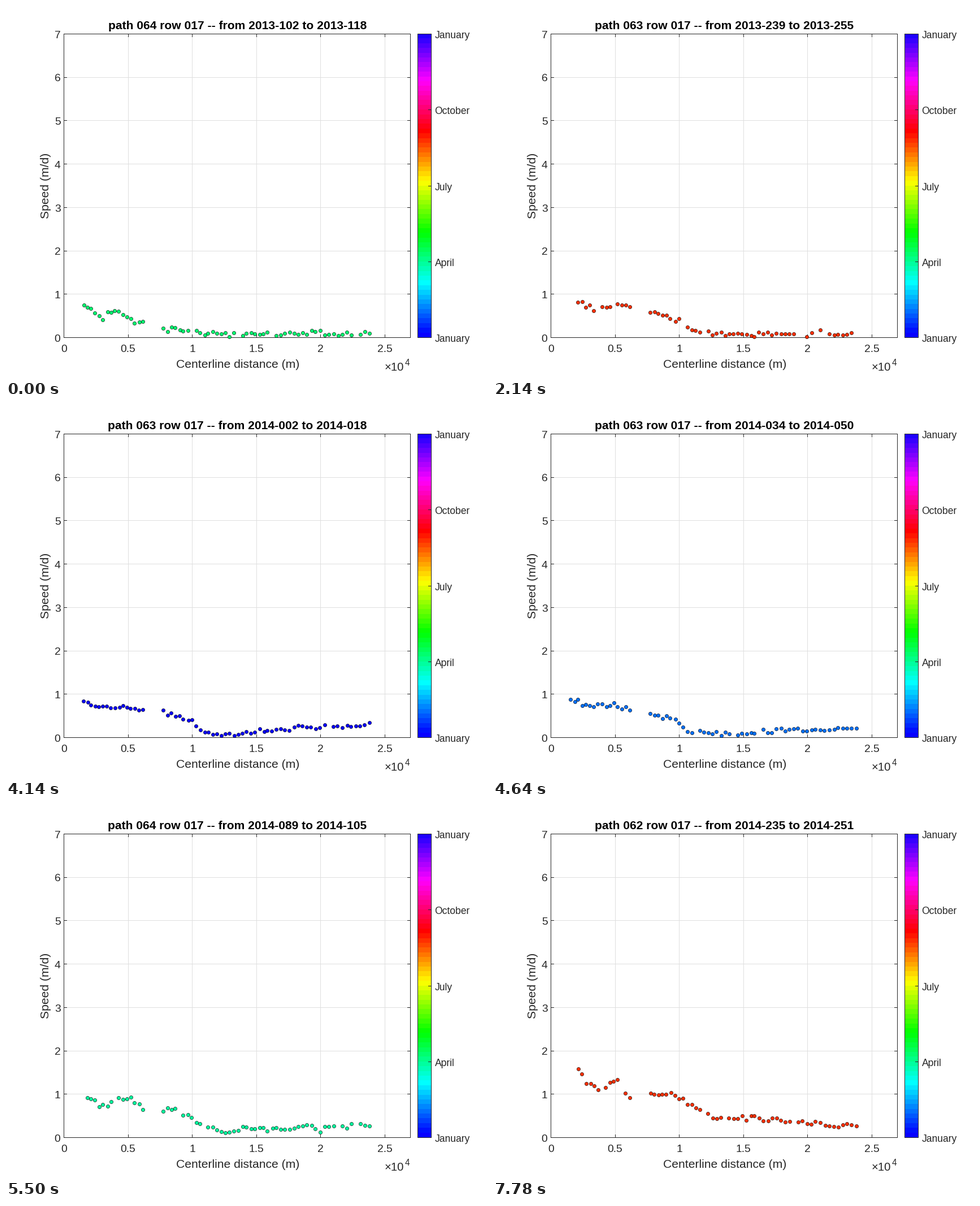
Animation, 851 px wide and 658 px high, one loop 8 s. Source, as a matplotlib script:

```python
import colorsys

import matplotlib.pyplot as plt
import numpy as np
from matplotlib.animation import FuncAnimation

WIDTH, HEIGHT, DPI = 851, 658, 64
PX = 72 / DPI                       # points per pixel
LEFT, RIGHT, TOP, BOTTOM = 102.5, 715.5, 49.5, 586.5
BAR_LEFT, BAR_RIGHT = 728.5, 752.5
UNIT_Y = (BOTTOM - TOP) / 7         # pixels per m/d
STEP_X = (RIGHT - LEFT) / 27 * 5    # pixels per 5 km
FRAME_MS, FRAMES = 25, 320
DAY_MS = 15.625
INK, GRID = "#262626", "#dfdfdf"

plt.rcParams["font.family"] = "Liberation Sans"

# Satellite track by phase of its 16-day cycle.
TRACKS = {6: "064", 8: "062", 15: "063"}

# First days of the image pairs, counted on from 1 January 2013.
DAYS = [102, 104, 150, 198, 223, 239, 294, 312, 328, 367, 383, 390, 399,
        406, 408, 415, 424, 431, 440, 454, 470, 486, 511, 568, 584, 600]

# Speed along the glacier on a few days: (stage x, m/d).
PROFILES = {
    102: [(136, .74), (170, .48), (189, .66), (220, .43), (275, .17),
          (305, .23), (343, .1), (641, .09)],
    150: [(157, .68), (181, .42), (207, .66), (234, .5), (300, .43),
          (325, .2), (641, .11)],
    239: [(149, .83), (176, .71), (231, .73), (285, .58), (306, .49),
          (356, .15), (400, .07), (638, .08)],
    367: [(140, .82), (172, .65), (205, .69), (285, .56), (326, .42),
          (341, .16), (405, .07), (510, .23), (638, .27)],
    424: [(140, .88), (168, .73), (202, .79), (240, .66), (312, .46),
          (348, .15), (375, .06), (640, .14)],
    511: [(154, .94), (182, .86), (206, 1.13), (235, 1), (314, .77),
          (389, .31), (430, .37), (510, .53), (638, .55)],
    600: [(152, 1.68), (163, 1.31), (194, 1.1), (220, 1.35), (236, 1.03),
          (317, 1), (387, .47), (490, .45), (638, .25)],
}


def date_text(day):
    year, index = divmod(day - 1, 365)
    return f"{2013 + year}-{index + 1:03d}"


def level_color(level):
    return colorsys.hsv_to_rgb((43 - level) / 64 % 1, 1, 1)


def stations(track):
    """Sample points: slowly widening spacing with a gap near the icefall."""
    n = np.arange(69)
    jitter = np.random.default_rng(int(track)).uniform(-1, 1, n.size)
    x = 137 + 6.9 * n + 0.0078 * n ** 2 + jitter
    return x[(x < 243) | (x > 273)]


def build_scene(day):
    """Return title, dot positions and dot colour of one image pair."""
    before = max(d for d in PROFILES if d <= day)
    after = min(d for d in PROFILES if d >= day)
    mix = (day - before) / max(after - before, 1)

    def blend(value):
        a, b = (value(*zip(*PROFILES[d])) for d in (before, after))
        return a + (b - a) * mix

    rng = np.random.default_rng(day)
    track = TRACKS[day % 16]
    x = stations(track)
    start = blend(lambda xs, speeds: xs[0])
    x = x[(x > start - 4) & (rng.random(x.size) > 0.08)]
    speed = blend(lambda xs, speeds: np.interp(x, xs, speeds))
    speed = np.maximum(speed + rng.normal(0, 0.035, x.size), 0.02)
    title = (f"path {track} row 017 -- from {date_text(day)}"
             f" to {date_text(day + 16)}")
    color = level_color(int((day - 1) % 365 / 365 * 64))
    return title, x, BOTTOM - speed * UNIT_Y, color


SCENES = {day: build_scene(day) for day in DAYS}

fig = plt.figure(figsize=(WIDTH / DPI, HEIGHT / DPI), dpi=DPI, facecolor="white")
ax = fig.add_axes([0, 0, 1, 1])


def line(xs, ys, color=INK):
    """Hairline through pixel centres."""
    xs, ys = np.floor(xs) + 0.5, np.floor(ys) + 0.5
    ax.plot(xs, ys, color=color, lw=PX, snap=False, solid_capstyle="projecting")


def box(x0, x1):
    line([x0, x1, x1, x0, x0], [TOP, TOP, BOTTOM, BOTTOM, TOP])


def label(x, y, text, size, **style):
    style = {"color": INK, "ha": "center", "va": "baseline", **style}
    return ax.text(x, y, text, fontsize=size * PX, **style)


bar = np.array([[level_color(level)] for level in range(64)])
ax.imshow(bar, extent=(BAR_LEFT, BAR_RIGHT, BOTTOM, TOP), origin="lower",
          aspect="auto", interpolation="nearest")

for i in range(1, 6):
    line([LEFT + i * STEP_X] * 2, [TOP, BOTTOM], GRID)
for j in range(1, 7):
    line([LEFT, RIGHT], [BOTTOM - j * UNIT_Y] * 2, GRID)
for i in range(6):
    x = LEFT + i * STEP_X
    line([x, x], [BOTTOM, BOTTOM - 5])
    line([x, x], [TOP, TOP + 5])
    label(x, 612.4, f"{i / 2:g}", 19.2)
for j in range(8):
    y = BOTTOM - j * UNIT_Y
    line([LEFT, LEFT + 5], [y, y])
    line([RIGHT, RIGHT - 5], [y, y])
    label(96.5, y + 7.2, str(j), 19.2, ha="right")
for k, month in enumerate(["January", "April", "July", "October", "January"]):
    y = BOTTOM - k * (BOTTOM - TOP) / 4
    line([BAR_RIGHT - 5, BAR_RIGHT], [y, y])
    label(758.5, y + 7.7, month, 17.5, ha="left")
box(LEFT, RIGHT)
box(BAR_LEFT, BAR_RIGHT)

label(410, 640.4, "Centerline distance (m)", 21.1)
label(76.5, 318, "Speed (m/d)", 21.1, rotation=90, rotation_mode="anchor")
label(669.5, 645, "×10", 20.3, ha="left")
label(706, 636, "4", 15.5, ha="left")
title = label(409.5, 41, "", 21.05, color="black", weight="bold")
dots, = ax.plot([], [], "o", ms=6.2 * PX, mec="black", mew=0.6 * PX,
                snap=False, zorder=5)

ax.set_xlim(0, WIDTH)
ax.set_ylim(HEIGHT, 0)
ax.axis("off")


def update(frame):
    now = DAYS[0] + ((frame + 1) * FRAME_MS - 1) / DAY_MS
    text, x, y, color = SCENES[max(day for day in DAYS if day <= now)]
    title.set_text(text)
    dots.set_data(x, y)
    dots.set_markerfacecolor(color)
    return title, dots


animation = FuncAnimation(fig, update, frames=FRAMES, interval=FRAME_MS,
                          repeat=True, repeat_delay=0)
plt.show()
```
